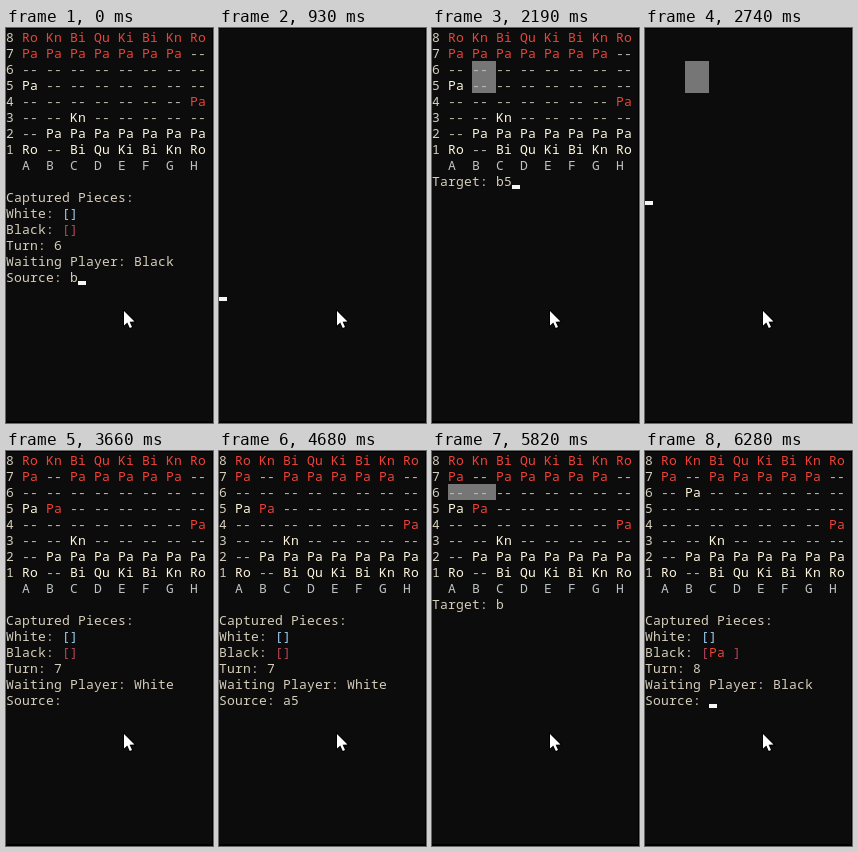
Recreate the animation shown at these times as an HTML page with a canvas. Size 207x395 px, loop 6.68 s.

```html
<!DOCTYPE html>
<html lang="en">
<head>
<meta charset="utf-8">
<title>Console chess</title>
<style>
  html, body { margin: 0; width: 100%; height: 100%; overflow: hidden; background: #0c0c0c; }
  canvas { display: block; }
</style>
</head>
<body>
<canvas id="stage" width="207" height="395"></canvas>
<script>
const ctx = document.getElementById('stage').getContext('2d');
const LOOP = 6680, CELL_W = 8, CELL_H = 16, TOP = 1;
const COLOR = {
  back: '#0c0c0c', text: '#d6cebb', dash: '#c4beb0', file: '#bcc2c4',
  white: '#fdf5dc', black: '#ee4239', whiteBox: '#9ccdf0', blackBox: '#b8465c',
  mark: '#767676', cursor: '#f5f5f5'
};

// Upper-case ranks hold one letter per square; lower case is Black.
const NAMES = { r: 'Ro', n: 'Kn', b: 'Bi', q: 'Qu', k: 'Ki', p: 'Pa' };
const START = ['rnbqkbnr', 'ppppppp.', '........', 'P.......',
               '.......p', '..N.....', '.PPPPPPP', 'R.BQKBNR'];
const withRanks = (board, ranks) => board.map((rank, i) => ranks[i] || rank);
const PUSHED = withRanks(START, { 1: 'p.ppppp.', 3: 'Pp......' });
const TAKEN = withRanks(PUSHED, { 2: '.P......', 3: '........' });

const TURNS = [
  { board: START, turn: 6, player: 'Black', taken: '' },
  { board: PUSHED, turn: 7, player: 'White', taken: '' },
  { board: TAKEN, turn: 8, player: 'Black', taken: 'Pa ' }
];

// Marked areas in cells: column, row, width, height
const PUSH_MARK = [5, 2, 3, 2], TAKE_MARK = [2, 2, 6, 1];

const source = (turn, typed, cursor = true) => ({ turn, prompt: 'Source: ', typed, cursor });
const target = (turn, mark, typed, cursor = true) => ({ turn, mark, prompt: 'Target: ', typed, cursor });
const cleared = (row, mark) => ({ cleared: row, mark });

const TIMELINE = [
  [0, source(0, 'b')],
  [380, source(0, 'b7')],
  [450, source(0, 'b7', false)],
  [930, cleared(16)],
  [1000, target(0, PUSH_MARK, '')],
  [1550, target(0, PUSH_MARK, '', false)],
  [1870, target(0, PUSH_MARK, 'b')],
  [2020, target(0, PUSH_MARK, 'b', false)],
  [2190, target(0, PUSH_MARK, 'b5')],
  [2570, target(0, PUSH_MARK, 'b5', false)],
  [2740, cleared(10, PUSH_MARK)],
  [2800, source(1, '')],
  [3660, source(1, '', false)],
  [4040, source(1, 'a')],
  [4190, source(1, 'a', false)],
  [4450, source(1, 'a5')],
  [4680, source(1, 'a5', false)],
  [4750, cleared(16)],
  [4820, target(1, TAKE_MARK, '')],
  [5750, target(1, TAKE_MARK, 'b')],
  [5820, target(1, TAKE_MARK, 'b', false)],
  [5920, target(1, TAKE_MARK, 'b6', false)],
  [5990, target(1, TAKE_MARK, 'b6')],
  [6220, source(2, '', false)],
  [6280, source(2, '')]
];

function print(text, col, row, color) {
  ctx.fillStyle = color;
  [...text].forEach((ch, i) =>
    ctx.fillText(ch, (col + i + 0.5) * CELL_W, TOP + row * CELL_H + 13));
}

function fillCells([col, row, w, h], color) {
  ctx.fillStyle = color;
  ctx.fillRect(col * CELL_W, TOP + row * CELL_H, w * CELL_W, h * CELL_H);
}

function drawCursor(col, row) {
  ctx.fillStyle = COLOR.cursor;
  ctx.fillRect(col * CELL_W, TOP + row * CELL_H + 12, CELL_W, 4);
}

function drawBoard(board) {
  board.forEach((rank, row) => {
    print(String(8 - row), 0, row, COLOR.text);
    [...rank].forEach((piece, file) => {
      const low = piece.toLowerCase();
      const color = piece === '.' ? COLOR.dash : piece === low ? COLOR.black : COLOR.white;
      print(NAMES[low] || '--', 2 + file * 3, row, color);
    });
  });
  [...'ABCDEFGH'].forEach((name, file) => print(name, 2 + file * 3, 8, COLOR.file));
}

function drawStatus({ turn, player, taken }) {
  print('Captured Pieces:', 0, 10, COLOR.text);
  print('White:', 0, 11, COLOR.text);
  print('[]', 7, 11, COLOR.whiteBox);
  print('Black:', 0, 12, COLOR.text);
  print('[', 7, 12, COLOR.blackBox);
  print(taken, 8, 12, COLOR.black);
  print(']', 8 + taken.length, 12, COLOR.blackBox);
  print('Turn: ' + turn, 0, 13, COLOR.text);
  print('Waiting Player: ' + player, 0, 14, COLOR.text);
}

function drawPointer() {
  const points = [[0, 0], [0, 14.5], [3.3, 11.5], [5.8, 17], [8, 16], [5.6, 10.7], [10.5, 10.5]];
  ctx.beginPath();
  points.forEach(([x, y]) => ctx.lineTo(118 + x, 283 + y));
  ctx.closePath();
  ctx.lineWidth = 2;
  ctx.strokeStyle = '#000';
  ctx.stroke();
  ctx.fillStyle = '#fff';
  ctx.fill();
}

function draw(state) {
  ctx.fillStyle = '#000';
  ctx.fillRect(0, 0, 207, 395);
  ctx.fillStyle = COLOR.back;
  ctx.fillRect(0, 1, 206, 392);
  if (state.mark) fillCells(state.mark, COLOR.mark);
  if (state.cleared) {
    drawCursor(0, state.cleared);
  } else {
    const turn = TURNS[state.turn];
    const line = state.prompt + state.typed;
    const row = state.mark ? 9 : 15;
    drawBoard(turn.board);
    if (!state.mark) drawStatus(turn);
    print(line, 0, row, COLOR.text);
    if (state.cursor) drawCursor(line.length, row);
  }
  drawPointer();
}

ctx.font = '13px "Noto Sans Mono", "DejaVu Sans Mono", monospace';
ctx.textAlign = 'center';
const begin = performance.now();

function tick() {
  const time = (performance.now() - begin) % LOOP;
  draw(TIMELINE.filter(([at]) => at <= time).pop()[1]);
  requestAnimationFrame(tick);
}
tick();
</script>
</body>
</html>
```
